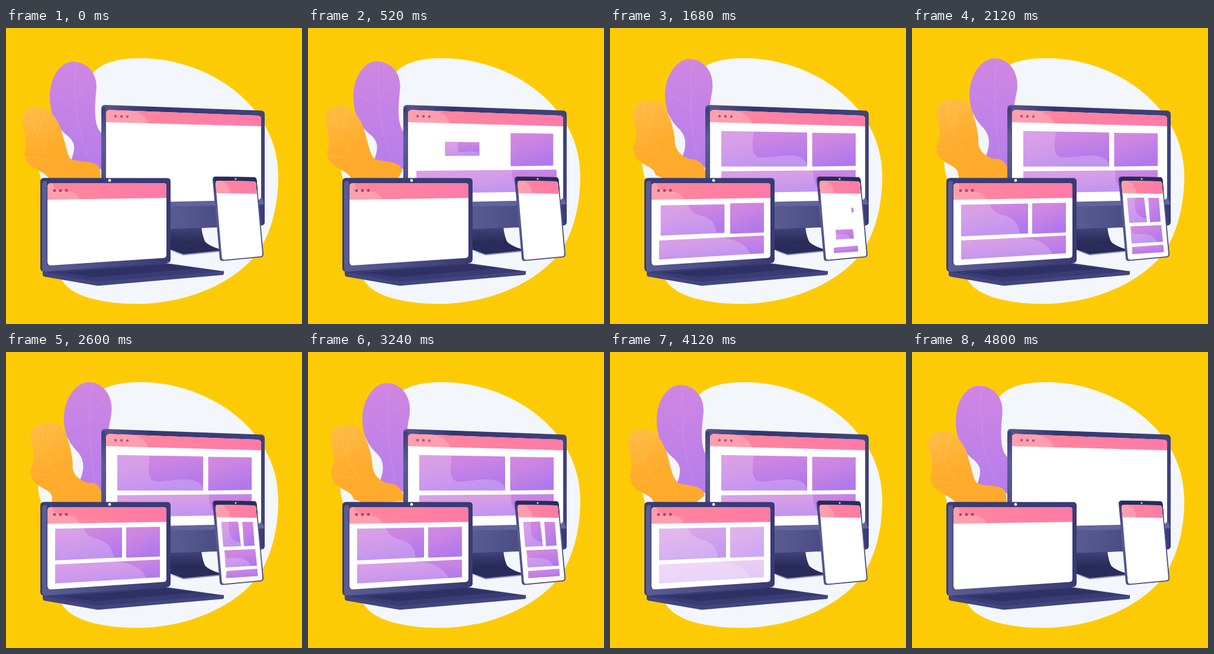
Animation of 500 by 500 pixels, one loop 4.84 s. Source, as an HTML page:

```html
<!DOCTYPE html>
<html lang="en">
<head>
<meta charset="utf-8">
<title>Responsive layout</title>
<style>
html, body { margin: 0; width: 100%; height: 100%; overflow: hidden; background: #fdcb06; }
svg { display: block; width: 100%; height: 100%; }
.block { transform-box: fill-box; transform-origin: center; fill: url(#violet); }
.shine { fill: #fff; fill-opacity: .2; }
.vein { fill: none; stroke-width: .8; stroke-opacity: .4; }
</style>
</head>
<body>
<svg viewBox="0 0 500 500">
  <defs>
    <linearGradient id="violet" x2=".45" y2="1"><stop stop-color="#d289e0"/><stop offset=".35" stop-color="#cd85e2"/><stop offset="1" stop-color="#b179ec"/></linearGradient>
    <linearGradient id="plum" x2="0" y2="1"><stop stop-color="#d086e2"/><stop offset="1" stop-color="#b57dec"/></linearGradient>
    <linearGradient id="amber" x2=".4" y2="1"><stop stop-color="#ffbd48"/><stop offset=".6" stop-color="#ffac2c"/><stop offset="1" stop-color="#ffaa2c"/></linearGradient>
    <linearGradient id="pink"><stop stop-color="#ff8799"/><stop offset="1" stop-color="#ff7aa8"/></linearGradient>
    <linearGradient id="frame"><stop stop-color="#56588f"/><stop offset=".3" stop-color="#34366f"/><stop offset="1" stop-color="#40427c"/></linearGradient>
    <linearGradient id="chin"><stop stop-color="#5a5c93"/><stop offset=".35" stop-color="#50528a"/><stop offset="1" stop-color="#393b73"/></linearGradient>
    <linearGradient id="neck" x2="0" y2="1"><stop stop-color="#41437d"/><stop offset="1" stop-color="#272955"/></linearGradient>
    <linearGradient id="side" x2="0" y2="1"><stop stop-color="#3b3d75"/><stop offset=".4" stop-color="#5b5d95"/><stop offset="1" stop-color="#4c4e86"/></linearGradient>
  </defs>

  <path fill="#f3f6fb" d="M228 51C338 51 460 128 460 250C460 305 445 356 420 386C375 438 295 466 222 466C150 466 105 448 94 425L58 250C50 225 54 170 76 146L104 146L148 75C165 56 195 51 228 51Z"/>
  <path id="tall" fill="url(#plum)"/>
  <path id="tallVeins" class="vein" stroke="#e2aef0"/>
  <path id="low" fill="url(#amber)"/>
  <path id="lowVeins" class="vein" stroke="#ffdf95"/>

  <g id="monitor">
    <path fill="#8f91bd" d="M278 376L300 384L361 378V375L300 381Z"/>
    <path fill="#292b59" d="M276 362L336 361Q345 369 361 373.500V376L300 382L276 374Z"/>
    <path fill="url(#neck)" d="M276 336H330Q332 354 338 364L276 364Z"/>
    <path fill="url(#frame)" d="M161 136Q161 129.500 168 130L431 139.500Q437 140 437 146V327Q437 333 431 333.500L161 345Z"/>
    <path fill="url(#side)" d="M161 140Q162 132 168 134V270H161Z"/>
    <path fill="url(#chin)" d="M270 302L437 297V327Q437 333 431 333.500L270 340Z"/>
    <path fill="#62649d" d="M270 294L425 290Q431 290 431 284L437 298L270 302Z"/>
    <path fill="#fff" d="M169 145Q169 138 176 138.500L425 148Q431 148.500 431 154V284Q431 290 425 290.300L169 296Z"/>
    <path fill="url(#pink)" d="M169 145Q169 138 176 138.500L425 148Q431 148.500 431 154V166L169 159Z"/>
    <path class="shine" d="M169 145Q169 138 176 138.500L212 140Q235 144 240 161L169 159Z"/>
    <g fill="#a9557e"><circle cx="185" cy="149" r="2.200"/><circle cx="195" cy="149.300" r="2.200"/><circle cx="205" cy="149.600" r="2.200"/></g>
  </g>

  <g id="laptop">
    <path fill="#393b74" d="M62 412L255 395L368 411V414L155 433L62 417Z"/>
    <path fill="#2f3164" d="M94 413L268 399L322 406L150 421Z"/>
    <path fill="#43457e" d="M62 412L153 429L368 410.500V415Q368 417 365 417.300L155 435.500L65 420Q62 419 62 416Z"/>
    <path fill="#393b74" d="M58 260Q58 253 65 253.300L272 253.500Q278 253.500 278 259V391Q278 396.500 272 397L65 412Q58 412 58 405Z"/>
    <path fill="url(#chin)" d="M61 264Q61 257 69 259V400L272 387V397L65 411.500Q61 411 61 405Z"/>
    <path fill="#fff" d="M70 268Q70 262 76 262H266Q271 262 271 267V383Q271 388 266 388.500L76 401Q70 401 70 395Z"/>
    <path fill="url(#pink)" d="M70 268Q70 262 76 262H266Q271 262 271 267V287L70 290Z"/>
    <path class="shine" d="M70 268Q70 262 76 262H78Q82 275 97 275Q120 276 125 289L70 290Z"/>
    <g fill="#925078"><circle cx="82" cy="274.500" r="2.500"/><circle cx="92" cy="274.500" r="2.500"/><circle cx="102" cy="274.300" r="2.500"/></g>
    <circle cx="175" cy="257.500" r="2.400" fill="#fff"/>
  </g>

  <g id="phone">
    <path fill="url(#side)" d="M349 256Q349 251 354 251L418 252Q423 252 423.500 257L435 381Q435.500 387 430 387.500L367 393.500Q361.500 394 361 389Z"/>
    <path fill="#292b59" d="M351 256Q351 251 356 251L418 252Q423 252 423.500 257L425 276L353 262Z"/>
    <path fill="#fff" d="M354 262Q354 258 358 258L418 259Q422 259 422.400 263L433 381Q433.500 385.300 429.500 385.700L369 391.400Q365 391.600 364.600 387.500Z"/>
    <path fill="url(#pink)" d="M354 262Q354 258 358 258L418 259Q422 259 422.400 263L423.800 280L355.500 279Z"/>
    <path class="shine" d="M354 262Q354 258 358 258H364Q377 263 379 279.300L355.500 279Z"/>
    <circle cx="388" cy="255" r="1.500" fill="#ffd98a"/>
  </g>
</svg>
<script>
const LOOP = 4840, POP = 440, FADE = 400;
const $ = id => document.getElementById(id);

// device, pop start, fade start, outline, lighter area
const blocks = [
  ["monitor", 165, 4200, "M188 242L415 240V275L188 279Z", "M188 242L343 240.700Q342 262 356 276L188 279Z"],
  ["monitor", 366, 4260, "M341.500 177L415 178V233L341.500 234Z", ""],
  ["monitor", 478, 4320, "M188 174L333 176.500V234H188Z", "M188 174L243 175C239 203 239 219 257 219S331 204 333 234H188Z"],
  ["laptop", 1100, 3880, "M83 359L260 350.500V380.500L83 391Z", "M83 359L165 355C205 351 231 364 237 382L83 391Z"],
  ["laptop", 1240, 3980, "M203 296.300L260 295.300V345.500L203 347.500Z", ""],
  ["laptop", 1535, 4020, "M83 298.500L196 296.500V347L83 352Z", "M83 298.500L132 297.600C139 326 178 306 182 347.600L83 352Z"],
  ["phone", 1581, 3440, "M372 370L424.500 366L425.500 378.500L372 382Z", ""],
  ["phone", 1616, 3490, "M369 335L421 333L424 361L371 364Z", "M369 335L373 348C393 348 408 346 414 361.700L371 364Z"],
  ["phone", 1662, 3540, "M399 287L417 287L420 327L402 328Z", ""],
  ["phone", 1705, 3590, "M363.500 287L392 286.500L397 328L367 329Z", "M363.500 287L377 286.800C374 312 383 320 396 321L397 328L367 329Z"]
].map(([device, start, end, outline, light]) => {
  const node = document.createElementNS("http://www.w3.org/2000/svg", "g");
  node.setAttribute("class", "block");
  node.innerHTML = `<path d="${outline}"/><path class="shine" d="${light}"/>`;
  $(device).append(node);
  return { node, start, end };
});

// each part sways between a left and a right pose
const leaves = {
  tall: ["M112 57C90 58 74 85 74 116C74 145 84 167 104 182C117 193 118 203 110 224L165 240L165 180C149 172 149 142 152 110C157 80 140 57 112 57Z",
         "M140 51C118 51 98 80 98 113C98 138 108 155 121 168C134 183 133 200 123 222L175 240L178 180C171 150 172 135 177 112C185 80 168 51 140 51Z"],
  tallVeins: ["M118 61C113 95 118 115 119 140S131 195 140 220M141 89Q123 105 119 125M80 112Q105 122 119 142",
              "M145 55C138 90 142 112 142 138S147 195 150 220M166 83Q145 95 141 117M104 114Q130 124 142 144"],
  low: ["M55 133C34 131 26 147 28 160C31 180 38 190 31 210C31 240 66 238 73 256L160 256L159 239C154 221 125 229 109 221C103 213 102 200 96 182C91 157 74 134 55 133Z",
        "M66 120C46 120 40 136 42 148C46 168 51 180 41 200C43 233 77 227 78 246L76 256L164 256L163 232C157 219 139 221 125 217C110 207 113 188 111 170C107 138 88 120 66 120Z"],
  lowVeins: ["M41 142C47 172 60 202 90 240M69 140Q58 155 56 180M31 219Q54 216 72 224",
             "M60 122C60 158 74 194 101 226M85 124Q72 143 69 165M42 205Q68 204 86 215"]
};

function mix(a, b, k) {
  const goals = b.match(/\d+/g);
  let i = 0;
  return a.replace(/\d+/g, n => (+n + (goals[i++] - n) * k).toFixed(2));
}

const clamp = x => Math.min(1, Math.max(0, x));

function backOut(u) {
  const v = u - 1;
  return u ? 1 + 2.70158 * v ** 3 + 1.70158 * v * v : 0;
}

function draw(now) {
  const t = now % LOOP;
  const sway = (1 - Math.cos(2 * Math.PI * t / LOOP)) / 2;
  for (const id in leaves) $(id).setAttribute("d", mix(...leaves[id], sway));
  for (const { node, start, end } of blocks) {
    node.style.transform = `scale(${backOut(clamp((t - start) / POP))})`;
    node.style.opacity = 1 - clamp((t - end) / FADE);
  }
  requestAnimationFrame(draw);
}

draw(0);
</script>
</body>
</html>
```
